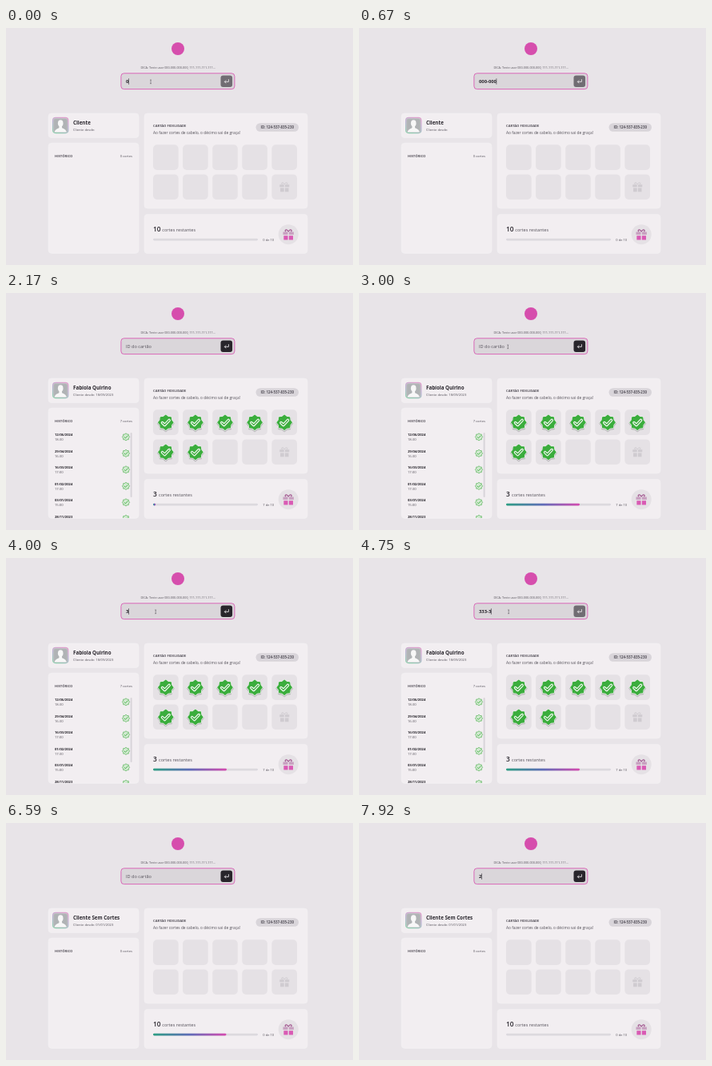
Write an HTML page that moves like this. It is 434 by 297 pixels and loops after 8 s.

```html
<!DOCTYPE html>
<html lang="pt-BR">
<head>
<meta charset="utf-8">
<title>Cartão fidelidade</title>
<style>
  html, body { margin: 0; width: 100%; height: 100%; overflow: hidden; background: #e8e4e8; }
  svg { display: block; width: 434px; height: 297px; }
  text { font-family: "Open Sans", "Noto Sans", sans-serif; font-size: 4.15px; fill: #55515a; }
  .bold { font-weight: 700; }
  .dark { fill: #28252c; }
  .title { font-size: 6.2px; font-weight: 700; fill: #28252c; }
  .card { fill: #f2eef1; stroke: #f4f1f4; stroke-width: .6; }
  .slot { fill: #e5e1e5; }
  .end { text-anchor: end; }
</style>
</head>
<body>
<svg viewBox="0 0 434 297">
  <defs>
    <linearGradient id="fade">
      <stop offset="0" stop-color="#2d9f84"/>
      <stop offset=".5" stop-color="#5f6cb8"/>
      <stop offset="1" stop-color="#d64bb0"/>
    </linearGradient>
    <linearGradient id="ring" x1=".7" y1="0" x2=".3" y2="1">
      <stop offset="0" stop-color="#dc9cca"/>
      <stop offset=".5" stop-color="#b4b0d0"/>
      <stop offset="1" stop-color="#8fccae"/>
    </linearGradient>
    <clipPath id="face"><rect x="59.6" y="113.4" width="17.2" height="17.2" rx="2.5"/></clipPath>
    <clipPath id="listClip"><rect x="53" y="172" width="113" height="110"/></clipPath>
    <path id="tick" d="M-4.2 .3L-1.3 3.1L4.3 -2.8" fill="none" stroke-linecap="round" stroke-linejoin="round"/>
    <path id="bow" d="M0 -3.2C-2.2 -7.5 -5.2 -4.4 -2.6 -3.2M0 -3.2C2.2 -7.5 5.2 -4.4 2.6 -3.2" fill="none" stroke="currentColor"/>
    <path id="lid" d="M-6 -3H-.6V0H-6ZM.6 -3H6V0H.6Z" fill="currentColor"/>
    <path id="box" d="M-5.2 1.2H-.6V6H-5.2ZM.6 1.2H5.2V6H.6Z" fill="currentColor"/>
  </defs>

  <circle cx="215" cy="26" r="8" fill="#d64ead"/>

  <text x="168.4" y="51.4" style="font-size:3.75px">DICA: Tente usar 000-000-000-000, 111-111-111-111...</text>
  <rect x="143.9" y="56.8" width="142" height="19.8" rx="3.7" fill="#dad6da" stroke="#d968b8"/>
  <text id="hint" x="150" y="68.8" style="font-size:5.6px">ID do cartão</text>
  <text id="typed" class="dark bold" x="150" y="69" style="font-size:5.85px"></text>
  <rect id="caret" y="63.3" width=".6" height="7.4" fill="#28252c"/>
  <rect id="button" x="268.5" y="59.5" width="14.6" height="14.6" rx="3"/>
  <path d="M278.4 64.2V67.4H273.4M275.2 65.5L273.3 67.4L275.2 69.3" fill="none" stroke="#f1eef1" stroke-width=".8"/>
  <path id="beam" d="M-.9 -2.5Q0 -2.5 0 -1.8Q0 -2.5 .9 -2.5M0 -2V2M-.9 2.5Q0 2.5 0 1.8Q0 2.5 .9 2.5" fill="none" stroke="#4a464d" stroke-width=".5"/>

  <rect class="card" x="53" y="107" width="113" height="30.5" rx="4"/>
  <rect x="58.6" y="112.4" width="19.2" height="19.2" rx="3.5" fill="#d5d5d8" stroke="url(#ring)" stroke-width="1.2"/>
  <rect x="59.6" y="113.4" width="17.2" height="17.2" rx="2.5" fill="#b0b3b5"/>
  <g clip-path="url(#face)" fill="#f7f7f7">
    <ellipse cx="68.2" cy="119.4" rx="3.3" ry="4.1"/>
    <path d="M60.8 131C60.8 126.5 65 126.5 66.4 125V122H70V125C71.5 126.5 75.6 126.5 75.6 131Z"/>
  </g>
  <text id="name" class="title" x="84" y="120.6"></text>
  <text id="since" x="84" y="128.6"></text>

  <rect class="card" x="53" y="144.3" width="113" height="138" rx="4"/>
  <text class="bold" x="61" y="161.6">HISTÓRICO</text>
  <text id="total" class="end" x="158" y="161.6"></text>
  <g id="history" clip-path="url(#listClip)">
    <rect x="155.6" y="175" width="2" height="81" rx="1" fill="#d8d4d9"/>
  </g>

  <rect class="card" x="173" y="107" width="204" height="119" rx="4"/>
  <text class="bold" x="184" y="123.7">CARTÃO FIDELIDADE</text>
  <text x="184" y="133.2" style="font-size:4.83px">Ao fazer cortes de cabelo, o décimo sai de graça!</text>
  <rect x="312.5" y="119.3" width="53.5" height="10.5" rx="5.2" fill="#d9d5da"/>
  <text class="bold" x="339.2" y="126.2" text-anchor="middle" style="font-size:4.4px">ID: 124-537-835-230</text>
  <g id="slots"></g>
  <g transform="translate(348.3 199.2)" color="#cfcbd0">
    <use href="#bow"/><use href="#lid"/><use href="#box"/>
  </g>
  <g id="stamps"></g>

  <rect class="card" x="173" y="233.5" width="204" height="49" rx="4"/>
  <text id="left" class="dark" x="184" y="255.3" style="font-size:8.4px;font-weight:600"></text>
  <text id="leftLabel" y="255" style="font-size:5.6px">cortes restantes</text>
  <rect x="184" y="263.7" width="131" height="2.7" rx="1.35" fill="#dcd9de"/>
  <rect id="bar" x="184" y="263.7" height="2.7" rx="1.35" fill="url(#fade)"/>
  <text id="progress" class="end" x="335" y="266.7" style="font-size:4px"></text>
  <circle cx="353.2" cy="258.7" r="12.5" fill="#e5e1e5"/>
  <g transform="translate(353.2 258.9) scale(1.12)">
    <use href="#bow" color="#a0558e"/><use href="#lid" color="#c9a2c1"/><use href="#box" color="#d95ab4"/>
  </g>
</svg>

<script>
const $ = id => document.getElementById(id);
const LOOP = 8000, FOUND = 2145, EMPTY = 6570;
const GUEST = { name: "Cliente", since: "Cliente desde:", cuts: 0 };
const MEMBER = { name: "Fabíola Quirino", since: "Cliente desde: 18/09/2023", cuts: 7 };
const NEWCOMER = { name: "Cliente Sem Cortes", since: "Cliente desde: 01/01/2023", cuts: 0 };
const VISITS = ["12/06/2024 18:30", "29/04/2024 16:30", "16/03/2024 17:00",
  "01/02/2024 17:30", "03/01/2024 15:00", "28/11/2023 16:00"];

// Eight-pointed seal
function seal(r) {
  const points = [];
  for (let i = 0; i < 16; i++) {
    const a = i * Math.PI / 8, d = i % 2 ? r * .81 : r;
    points.push((d * Math.sin(a)).toFixed(2) + "," + (-d * Math.cos(a)).toFixed(2));
  }
  return points.join(" ");
}

const add = (parent, markup) => parent.insertAdjacentHTML("beforeend", markup);

for (let i = 0; i < 10; i++) {
  const x = 184 + i % 5 * 37.1, y = i < 5 ? 146.3 : 183.4;
  add($("slots"), `<rect class="slot" x="${x}" y="${y}" width="31.6" height="31.6" rx="5"/>`);
  if (i < MEMBER.cuts) add($("stamps"), `<g transform="translate(${x + 15.8} ${y + 16})" stroke-linejoin="round">
    <polygon points="${seal(10.2)}" fill="#b9b8ba" stroke="#b9b8ba" stroke-width="1.4" transform="translate(0 1)"/>
    <polygon points="${seal(10.2)}" fill="#eef2ed" stroke="#eef2ed" stroke-width="1"/>
    <polygon points="${seal(9)}" fill="#3bad3d" stroke="#3bad3d" stroke-width="1.4"/>
    <use href="#tick" stroke="#f4f7f3" stroke-width="3.6"/>
    <use href="#tick" stroke="#3bad3d" stroke-width="1.3"/></g>`);
}

VISITS.forEach((visit, i) => {
  const [day, hour] = visit.split(" "), y = i * 20.5;
  add($("history"), `<text class="dark bold" x="61" y="${179.2 + y}">${day}</text>
    <text x="61" y="${185.4 + y}">${hour}</text>
    <g transform="translate(150 ${180.4 + y})">
      <polygon points="${seal(4.6)}" fill="#d3ead2" stroke="#6cbd6c" stroke-width=".9" stroke-linejoin="round"/>
      <use href="#tick" transform="scale(.48)" stroke="#3bad3d" stroke-width="1.8"/></g>`);
});

const clamp = v => Math.min(1, Math.max(0, v));

// cubic-bezier(.25, .1, .25, 1)
function ease(x) {
  if (x <= 0 || x >= 1) return clamp(x);
  const curve = (a, b, s) => 3 * a * s * (1 - s) ** 2 + 3 * b * s * s * (1 - s) + s ** 3;
  let low = 0, high = 1;
  for (let i = 0; i < 20; i++) {
    const mid = (low + high) / 2;
    if (curve(.25, .25, mid) < x) low = mid; else high = mid;
  }
  return curve(.1, 1, low);
}

const cardId = (digit, count) => digit.repeat(count).replace(/(.{3})(?=.)/g, "$1-");
const keys = (t, start, gap) => Math.min(12, 1 + Math.floor((t - start) / gap));

function entry(t) {
  if (t < FOUND) return cardId("0", keys(t, 0, 125));
  if (t >= 4000 && t < EMPTY) return cardId("3", keys(t, 4000, 190));
  return t >= 7915 ? "2" : "";
}

function buttonColor(t) {
  let on = 0;
  if (t < FOUND) on = 1;
  else if (t >= 4000 && t < EMPTY) on = clamp((t - 4000) / 200);
  const mix = (a, b) => Math.round(a + (b - a) * on);
  return `rgb(${mix(40, 113)},${mix(37, 109)},${mix(43, 115)})`;
}

const show = (id, on) => $(id).setAttribute("visibility", on ? "visible" : "hidden");

function draw(t) {
  const who = t < FOUND ? GUEST : t < EMPTY ? MEMBER : NEWCOMER;
  $("name").textContent = who.name;
  $("since").textContent = who.since;
  $("total").textContent = who.cuts + " cortes";
  $("left").textContent = 10 - who.cuts;
  $("leftLabel").setAttribute("x", who.cuts ? 191 : 195.3);
  $("progress").textContent = who.cuts + " de 10";
  show("history", who.cuts);
  show("stamps", who.cuts);

  const width = 92 * (ease((t - FOUND) / 500) - ease((t - EMPTY - 15) / 500));
  $("bar").setAttribute("width", Math.max(0, width));

  const text = entry(t);
  $("typed").textContent = text;
  show("hint", !text);
  show("caret", text || (t >= 3170 && t < 3500));
  $("caret").setAttribute("x", 149.7 + (text ? $("typed").getComputedTextLength() : 0));
  $("button").setAttribute("fill", buttonColor(t));

  show("beam", t < 500 || (t >= 2995 && t < 5200));
  $("beam").setAttribute("transform", `translate(${t < 500 ? 181 : t < 3250 ? 186.3 : 187.2} 67.3)`);
}

const begin = performance.now();
function loop() {
  draw((performance.now() - begin) % LOOP);
  requestAnimationFrame(loop);
}
loop();
</script>
</body>
</html>
```
